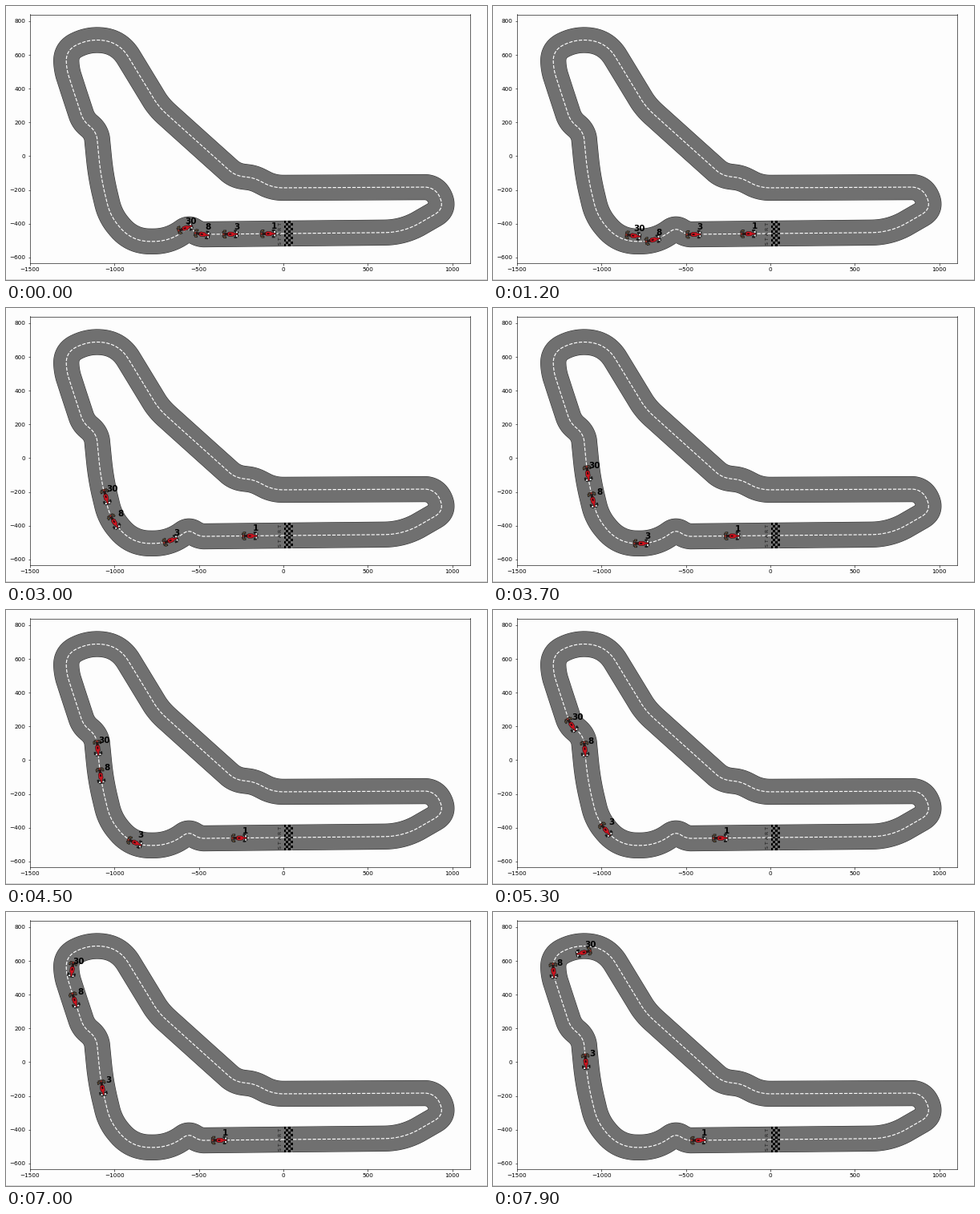
A matplotlib script that plays this animation: 600x342 px, repeating every 8 s.

```python
import numpy as np
import matplotlib.pyplot as plt
from matplotlib.animation import FuncAnimation
from matplotlib.patches import Polygon, Rectangle
from matplotlib.transforms import Affine2D

W, H = 600, 342
FRAMES, STEP = 80, 100
PAPER, ASPHALT, INK = "#fdfdfd", "#707070", "#1c1c1c"

plt.rcParams["font.family"] = "DejaVu Sans"

# Track corners in driving order: x, y, length of the rounding on each side
CORNERS = np.array([
    (346, 284, 0), (241, 285.2, 7.5), (228, 276.5, 8), (204, 293.8, 20),
    (157, 293.9, 23), (130, 262, 16), (118, 212, 24), (113, 157, 11),
    (96.5, 143.5, 9), (75.7, 80, 10), (74.5, 55, 15), (102, 42, 14),
    (140.5, 43.5, 24), (190.5, 126, 13), (286, 212, 11), (309, 214.3, 9),
    (333, 227, 13), (536, 225.9, 15), (547, 253, 14), (496, 282.6, 24),
])


def rounded(corners, n=24):
    """Closed polygon whose corners are replaced by quadratic curves."""
    u = np.linspace(0, 1, n)[:, None]
    p, reach = corners[:, :2], corners[:, 2:]
    ahead = np.roll(p, -1, 0) - p
    ahead /= np.hypot(*ahead.T)[:, None]
    enter, leave = p - reach * np.roll(ahead, 1, 0), p + reach * ahead
    parts = [(1 - u)**2 * a + 2*u*(1 - u) * b + u**2 * c
             for a, b, c in zip(enter, p, leave)]
    return np.vstack(parts + [p[:1]])


def lengths(path):
    return np.concatenate([[0], np.cumsum(np.hypot(*np.diff(path, axis=0).T))])


def lookup(path, d, s):
    return np.column_stack([np.interp(s, d, path[:, k]) for k in (0, 1)])


def directions(path):
    d = np.gradient(path, axis=0)
    return d / np.hypot(*d.T)[:, None]


rough = rounded(CORNERS)
rough_len = lengths(rough)
line = lookup(rough, rough_len, np.linspace(0, rough_len[-1], 1500))
dist = lengths(line)
tx, ty = directions(line).T
inside = np.column_stack([-ty, tx])

# How far a corner-cutting car leaves the centre line in the two big bends
apex = (7 * np.exp(-((dist - 180) / 55)**2)
        + 11 * np.exp(-((dist - 462) / 45)**2))[:, None]


fig = plt.figure(figsize=(W / 72, H / 72), dpi=72, facecolor=PAPER)

# Plot frame with ticks
plot = fig.add_axes([29.5 / W, 1 - 321.4 / H, 549.9 / W, 310.9 / H], facecolor=PAPER)
plot.set_xlim(-1502, 1107)
plot.set_ylim(-636, 840)
plot.set_xticks(range(-1500, 1001, 500))
plot.set_yticks(range(-600, 801, 200))
plot.tick_params(labelsize=7.3, length=2.5, width=0.6, pad=2.4)
for spine in plot.spines.values():
    spine.set_linewidth(0.6)

# Pixel stage on top
ax = fig.add_axes([0, 0, 1, 1])
ax.set_xlim(0, W)
ax.set_ylim(H, 0)
ax.axis("off")
ax.add_patch(Rectangle((0, 341), W, 1, fc="#d4d4d4", lw=0))

for color, width in (("#303030", 32.3), (ASPHALT, 31.2)):
    ax.plot(*line.T, color=color, lw=width, solid_joinstyle="round",
            solid_capstyle="butt", zorder=1)
ax.plot(*line.T, "--", color="white", lw=1.15, zorder=2)

# Start line
COLS, ROWS = 4, 11
left, top, cw, ch = 346.5, 268, 11.5 / COLS, 32 / ROWS
ax.add_patch(Rectangle((left, top), COLS * cw, ROWS * ch, fc=ASPHALT, lw=0, zorder=3))
for c in range(COLS):
    for r in range(c % 2, ROWS, 2):
        ax.add_patch(Rectangle((left + c * cw, top + r * ch), cw, ch,
                               fc="black", lw=0, zorder=3))
ax.text(343, 284, "S T A R T", size=6.2, rotation=90, color=INK,
        ha="center", va="center", zorder=3)


class Car:
    """Car that drives along its line with steady acceleration."""

    def __init__(self, name, start, speed, accel, cut=0):
        self.path = line + cut * apex * inside
        self.d = lengths(self.path)
        self.heading = directions(self.path)
        self.start = np.interp(start, dist, self.d)
        self.speed, self.accel = speed, accel
        self.parts = []
        self.build()
        self.label = ax.text(0, 0, name, size=10.4, weight="bold", ha="center",
                             va="center", zorder=6)

    def add(self, pts, color, edge="none"):
        patch = Polygon(pts, closed=True, fc=color, ec=edge, lw=0.5, zorder=5)
        ax.add_patch(patch)
        self.parts.append(patch)

    def box(self, u, v, w, h, color):
        self.add([(u + i * w / 2, v + j * h / 2)
                  for i, j in ((-1, -1), (1, -1), (1, 1), (-1, 1))], color)

    def build(self):
        self.box(9, 0, 1.5, 8, "#33251d")
        self.box(3.5, 0, 10, 3.4, "#2b1614")
        self.box(8, 0, 2, 1.6, "#b0342c")
        for u in (6.4, -6.8):
            self.box(u, 0, 0.9, 9, INK)
            for v in (-4, 4):
                self.box(u, v, 3.8, 2.5, INK)
        for side in (-1, 1):
            self.box(6.6, 3.9 * side, 2, 1, "#8a6a3c")
            self.box(-8.5, 2.2 * side, 2, 1.8, "#f0f0f0")
        nose = [(3, 1.4), (1.5, 2.7), (-3.5, 2.6), (-5.5, 1.2), (-9.5, 0.7)]
        self.add(nose + [(u, -v) for u, v in nose[::-1]], "#cf1420", "#1a0808")
        self.box(-0.2, 0, 3, 1.8, "#2a0b0b")
        self.box(-10, 0, 1, 7, INK)

    def move(self, t):
        s = self.start + self.speed * t + self.accel * t * t / 2
        (x, y), = lookup(self.path, self.d, s + np.zeros(1))
        (dx, dy), = lookup(self.heading, self.d, s + np.zeros(1))
        pose = Affine2D().rotate(np.arctan2(dy, dx)).translate(x, y)
        for part in self.parts:
            part.set_transform(pose + ax.transData)
        self.label.set_position((x + 8, y - 9))


cars = [
    Car("1", 19.2, 6.8, 0.55),
    Car("3", 66.5, 23.6, 1.8),
    Car("8", 102, 41.2, 0.15),
    Car("30", 123.5, 41.8, 0.3, cut=1),
]


def update(i):
    for car in cars:
        car.move(i * STEP / 1000)
    return []


anim = FuncAnimation(fig, update, frames=FRAMES, interval=STEP, repeat=True,
                     repeat_delay=0, blit=False)
plt.show()
```
